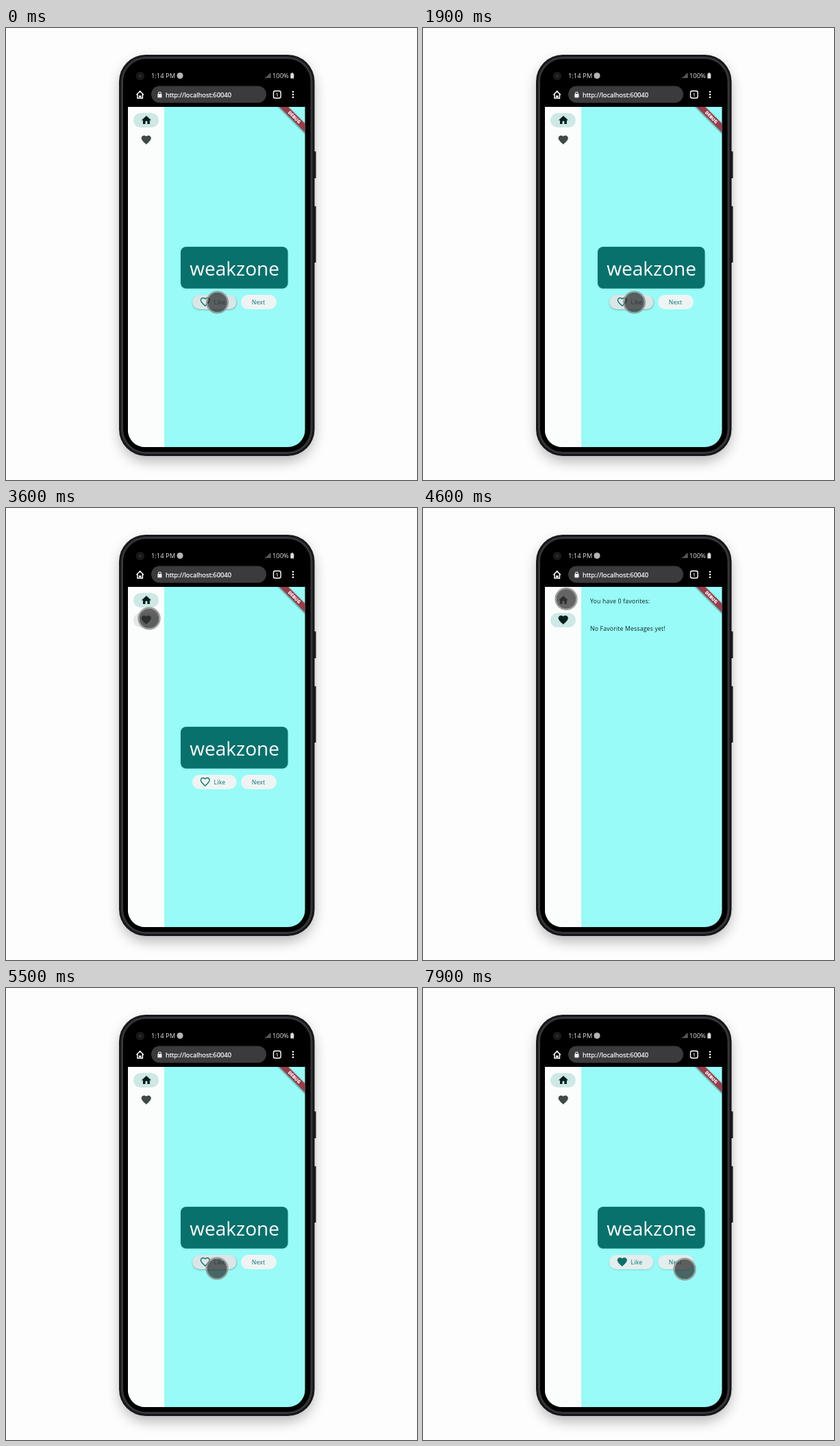
Write an HTML page that moves like this. It is 600 by 659 pixels and loops after 8 s.

```html
<!DOCTYPE html>
<html lang="en">
<head>
<meta charset="utf-8">
<style>
html, body { margin: 0; width: 100%; height: 100%; overflow: hidden; background: #fefdfe; }
svg { display: block; width: 600px; height: 659px; font-family: "Open Sans", "Noto Sans", sans-serif; }
.bar { font-size: 9.4px; fill: #e6e6e6; }
.label { font-size: 8.6px; font-weight: 500; fill: #0b706b; letter-spacing: .25px; }
.note { font-size: 8.6px; fill: #0a2322; letter-spacing: .22px; }
</style>
</head>
<body>
<svg viewBox="0 0 600 659">
  <defs>
    <path id="heart" d="M12 21.35l-1.45-1.32C5.4 15.36 2 12.28 2 8.5 2 5.42 4.42 3 7.5 3c1.74 0 3.41.81 4.5 2.09C13.09 3.81 14.76 3 16.5 3 19.58 3 22 5.42 22 8.5c0 3.78-3.4 6.86-8.55 11.54z"/>
    <path id="house" d="M10 20v-6h4v6h5v-8h3L12 3 2 12h3v8z"/>
    <clipPath id="screen"><path d="M178 115H436.500V586a25 25 0 0 1-25 25H203a25 25 0 0 1-25-25z"/></clipPath>
    <filter id="soft" x="-20%" y="-20%" width="140%" height="140%"><feGaussianBlur stdDeviation="10"/></filter>
    <filter id="blur" x="-20%" y="-40%" width="140%" height="180%"><feGaussianBlur stdDeviation="1"/></filter>
  </defs>

  <!-- phone body -->
  <rect x="167" y="48" width="282" height="583" rx="40" opacity=".3" filter="url(#soft)"/>
  <path d="M449 182q0-3 3.500-2V219h-3.500zM449 262q0-3 3.500-2V342h-3.500z" fill="#1d1d20"/>
  <rect x="165" y="39" width="285.500" height="585" rx="39" fill="#17171a"/>
  <rect x="169.500" y="43.500" width="276.500" height="576" rx="35" stroke="#36363a" stroke-width="3"/>

  <!-- status bar -->
  <circle cx="196" cy="70" r="6.200" fill="#191919"/>
  <path d="M194.500 69l1.500-.5 0 3 1.500-.5" fill="none" stroke="#555" stroke-width=".8"/>
  <text class="bar" x="212" y="73">1:14 PM</text>
  <circle cx="254" cy="69.500" r="4.600" fill="#b4b4b4"/>
  <path d="M379.500 73v-1.500M381.500 73v-3M383.500 73v-5M385.500 73v-7" stroke="#aaa"/>
  <text class="bar" x="389" y="73">100%</text>
  <path d="M415.300 66.500h1.400v-1.300h2.200v1.300h1.400V73.500h-5z" fill="#ddd"/>

  <!-- address bar -->
  <path d="M190.500 97.500L195.700 92l5.200 5.500M192 96.500v6h2.700v-3.300h2v3.300h2.700v-6" fill="none" stroke="#fff" stroke-width="1.500"/>
  <rect x="212" y="84.500" width="168" height="24.500" rx="12.250" fill="#3b3b3e"/>
  <rect x="221.300" y="96" width="6.200" height="5.500" rx=".8" fill="#eee"/>
  <path d="M222.600 96.500v-1.500a1.800 1.800 0 0 1 3.600 0v1.500" fill="none" stroke="#eee" stroke-width="1.100"/>
  <text class="bar" x="233" y="100.500" style="fill:#fff" stroke="#fff" stroke-width=".25">http://localhost:60040</text>
  <rect x="390.500" y="91.800" width="10.600" height="10.400" rx="2.500" fill="none" stroke="#fff" stroke-width="1.400"/>
  <text x="395.800" y="99.600" font-size="7" font-weight="600" fill="#fff" text-anchor="middle">1</text>
  <g fill="#fff"><circle cx="419" cy="93" r="1.300"/><circle cx="419" cy="97" r="1.300"/><circle cx="419" cy="101" r="1.300"/></g>

  <g clip-path="url(#screen)">
    <path d="M178 115H437V611H178z" fill="#98fbf7"/>
    <path d="M178 115H231V611H178z" fill="#fbfdfd"/>

    <!-- navigation -->
    <rect id="navHover" x="186" y="153" width="37" height="21" rx="10.500" fill="#e2e8e8"/>
    <rect id="homePill" y="124" height="21" rx="10.500" fill="#cde8e5"/>
    <rect id="favPill" y="153" height="21" rx="10.500" fill="#cde8e5"/>
    <use id="homeIcon" href="#house" transform="translate(196.400 125.900) scale(.71)"/>
    <use id="favIcon" href="#heart" transform="translate(196.200 154.500) scale(.71)"/>

    <g id="homePage">
      <rect x="255" y="319.500" width="156.500" height="61" rx="8" opacity=".15" filter="url(#blur)"/>
      <rect x="255" y="319" width="156.500" height="60.800" rx="8" fill="#08716c"/>
      <text x="268.300" y="361" font-size="28" fill="#fff">weakzone</text>
      <rect id="likeShade" x="272" y="390" width="65" height="21" rx="10.500" filter="url(#blur)"/>
      <rect id="nextShade" x="343" y="390" width="52" height="21" rx="10.500" filter="url(#blur)"/>
      <rect id="like" x="272" y="389" width="64.500" height="21" rx="10.500"/>
      <rect id="next" x="343" y="389" width="52" height="21" rx="10.500"/>
      <use id="full" href="#heart" transform="translate(282.200 390.800) scale(.71)" fill="#0b706b"/>
      <use id="empty" href="#heart" transform="translate(283.100 391.600) scale(.635)" fill="none" stroke="#0b706b" stroke-width="2.200"/>
      <text class="label" x="303.500" y="403">Like</text>
      <text class="label" x="358.700" y="403">Next</text>
    </g>

    <g id="favPage">
      <text class="note" x="244" y="138.500">You have 0 favorites:</text>
      <text class="note" x="244" y="178.500">No Favorite Messages yet!</text>
    </g>

    <g transform="translate(421 130) rotate(45)">
      <rect x="-35" y="-4" width="70" height="10" opacity=".45" filter="url(#blur)"/>
      <rect x="-35" y="-4.200" width="70" height="8.800" fill="#9c3c49"/>
      <text y="2.400" font-size="6.600" font-weight="800" fill="#fff" text-anchor="middle">DEBUG</text>
    </g>

    <g id="cursor">
      <circle r="14.500" fill="#262626" fill-opacity=".7"/>
      <circle r="15.500" fill="none" stroke="#8e8e8e" stroke-opacity=".8" stroke-width="2.400"/>
    </g>
  </g>
</svg>
<script>
const LOOP = 8000;
const $ = id => document.getElementById(id);
const set = (id, attrs) => { for (const k in attrs) $(id).setAttribute(k, attrs[k]); };
const show = (id, on) => set(id, { display: on ? "inline" : "none" });

// Keys are [time, ...values], eased between neighbours.
function track(t, keys) {
  const i = keys.findIndex(k => k[0] > t);
  if (i === 0) return keys[0].slice(1);
  if (i < 0) return keys[keys.length - 1].slice(1);
  const a = keys[i - 1], b = keys[i];
  const p = (t - a[0]) / (b[0] - a[0]), e = p * p * (3 - 2 * p);
  return a.slice(1).map((v, n) => v + (b[n + 1] - v) * e);
}

const path = [[1900, 308.5, 400], [2700, 209, 161], [4150, 209, 161], [4500, 209, 132.5],
  [4850, 209, 132.5], [5400, 308, 409], [5550, 308, 409], [5900, 310, 416.5],
  [6400, 312, 410], [7350, 312, 410], [7800, 382, 410]];
const likeHover = [[1900, 1], [2050, 0], [5300, 0], [5400, 1], [5550, 1], [5700, 0],
  [7000, 0], [7100, 1], [7500, 1], [7900, .5]];
const nextHover = [[7650, 0], [7900, .5]];
const navHover = [[2550, 0], [2700, 1], [4200, 1], [4350, 0]];
const favTab = [[3700, 0], [3950, 1], [4800, 1], [5050, 0]];

function button(id, h) {
  set(id, { fill: `rgb(${238 - 20 * h},${244 - 14 * h},${244 - 14 * h})` });
  set(id + "Shade", { opacity: .28 * h });
}

function pill(id, amount) {
  set(id, { x: 204.5 - 18.5 * amount, width: 37 * amount, opacity: amount });
}

function draw(t) {
  const [x, y] = track(t, path);
  const fav = track(t, favTab)[0];
  const onFav = t >= 3700 && t < 4800;
  const liked = t >= 600 && t < 1600 || t >= 7150;
  set("cursor", { transform: `translate(${x} ${y})` });
  button("like", track(t, likeHover)[0]);
  button("next", track(t, nextHover)[0]);
  set("navHover", { opacity: track(t, navHover)[0] });
  pill("homePill", 1 - fav);
  pill("favPill", fav);
  set("homeIcon", { fill: onFav ? "#3f4948" : "#05201e" });
  set("favIcon", { fill: onFav ? "#05201e" : "#3f4948" });
  show("homePage", !onFav);
  show("favPage", onFav);
  show("full", liked);
  show("empty", !liked);
}

const start = performance.now();
function tick() {
  draw((performance.now() - start) % LOOP);
  requestAnimationFrame(tick);
}
tick();
</script>
</body>
</html>
```
